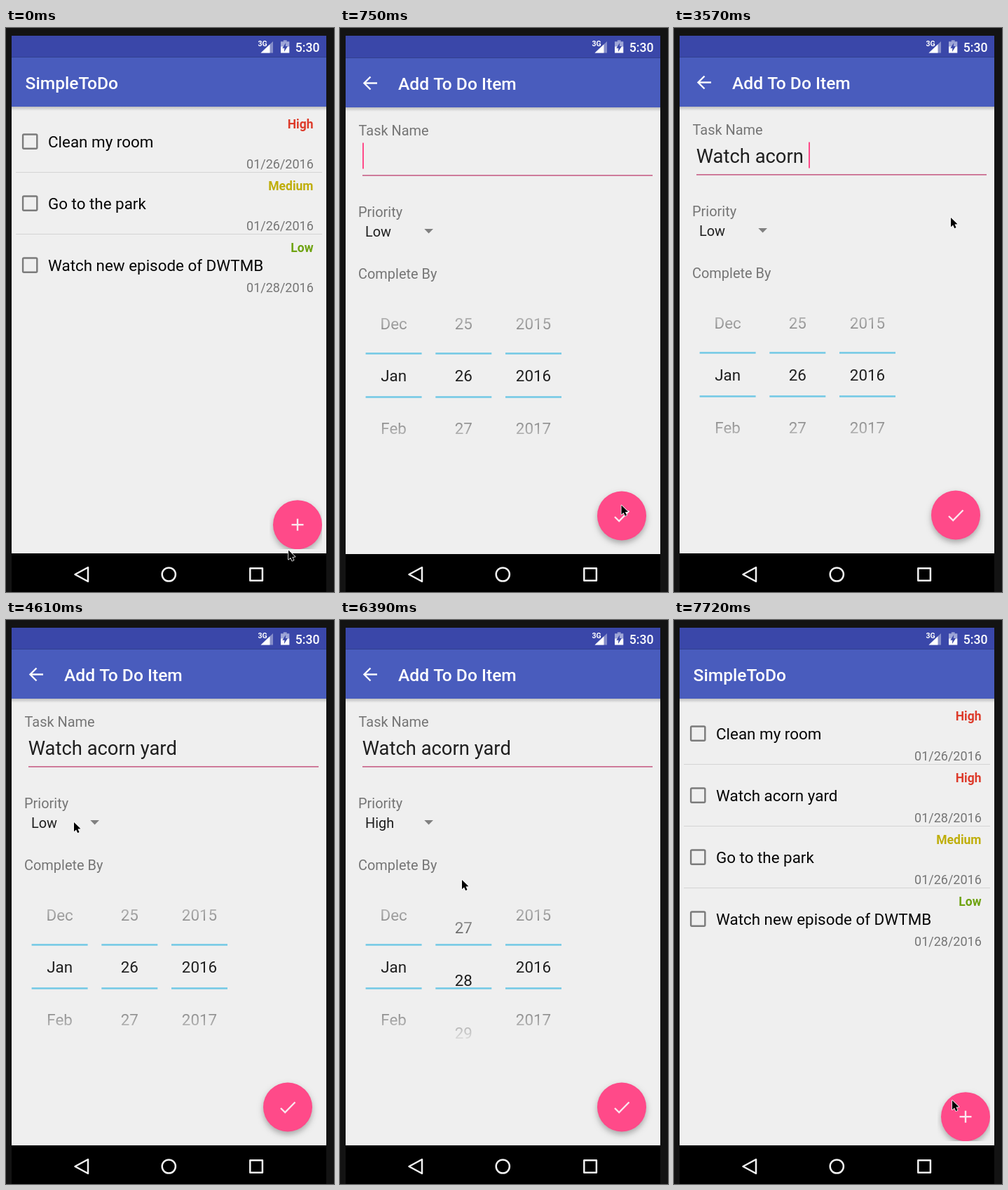
Recreate the animation shown at these times as an HTML page with a canvas. Size 468 by 803 pixels, loop 8000 ms.

```html
<!DOCTYPE html>
<html lang="en">
<head>
<meta charset="utf-8">
<title>To-do app</title>
<style>
  html, body { margin: 0; width: 100%; height: 100%; overflow: hidden; background: #131313; }
  canvas { display: block; }
</style>
</head>
<body>
<canvas id="stage" width="468" height="803"></canvas>
<script>
// The picture advances in equal steps; all times below are in steps.
const LOOP = 8000, STEPS = 54;
const OPEN = 4, TYPE = 9, POPUP = 32, PRESS = 37, PICK = 38, DRAG = 39, DROP = 43, CLOSE = 51, SAVED = 52;

const BG = '#efefef', CLEAR_BG = 'rgba(239,239,239,.2)', PINK = '#ff4a89';
const INK = '#1f1f1f', GREY = '#757575', WHITE = '#f2f2f2';
const LEVELS = { High: '#dd3b2b', Medium: '#bfae0a', Low: '#6fa312' };
const ROW = 74.7;

// Keys struck in each step; "<" is backspace
const KEYS = 'W,a,,ch,,,<,<,t,c,h, a,co,rn,, ,y,a,r,d'.split(',');

const POINTER_START = { x: 403, y: 743.5 };
const MOVES = [
  { from: 0, to: 2, x: 402.5, y: 727 },
  { from: 3, to: OPEN, x: 401.5, y: 679.5 },
  { from: 5, to: 7, x: 395, y: 270 },
  { from: 28, to: 31, x: 97, y: 288 },
  { from: 33, to: 36, x: 81, y: 417 },
  { from: PRESS, to: PICK, x: 178, y: 500 },
  { from: DRAG, to: DROP, x: 174, y: 370 },
  { from: DROP, to: 46, x: 417, y: 759 },
  { from: 46, to: 48, x: 397, y: 684 }
];

const stage = document.getElementById('stage').getContext('2d');
const layer = Object.assign(document.createElement('canvas'), { width: 468, height: 803 }).getContext('2d');
let c = stage;

const progress = (s, from, to) => Math.min(1, Math.max(0, (s - from) / (to - from)));
const smooth = k => k * k * (3 - 2 * k);
const easeOut = k => 1 - (1 - k) ** 2;

function typed(s) {
  const keys = KEYS.slice(0, Math.max(0, s - TYPE + 1)).join('');
  return [...keys].reduce((word, key) => key === '<' ? word.slice(0, -1) : word + key, '');
}

function pointerAt(s) {
  return MOVES.reduce((p, move) => {
    const k = smooth(progress(s, move.from, move.to));
    return { x: p.x + (move.x - p.x) * k, y: p.y + (move.y - p.y) * k };
  }, POINTER_START);
}

// Days scrolled: a drag, then a slow snap onto the nearest row
const daysScrolled = s => 1.75 * smooth(progress(s, DRAG, DROP)) + 0.25 * easeOut(progress(s, DROP, 48));

// Solid while typing, later blinking once a second
const caretOn = s => s < 31 || (s > DRAG && (s + 2) % 6.75 < 3.375);

function rect(x, y, w, h, fill) {
  c.fillStyle = fill;
  c.fillRect(x, y, w, h);
}

// y is the middle of the capital letters
function text(str, x, y, size, fill, { weight = 400, align = 'left' } = {}) {
  c.font = `${weight} ${size}px Roboto, sans-serif`;
  c.textAlign = align;
  c.fillStyle = fill;
  c.fillText(str, x, y + size * 0.355);
}

function path(points, closed) {
  c.beginPath();
  points.forEach(([x, y]) => c.lineTo(x, y));
  if (closed) c.closePath();
}

function circle(x, y, r) {
  c.beginPath();
  c.arc(x, y, r, 0, 2 * Math.PI);
}

function box(x, y, w, h, r) {
  c.beginPath();
  c.roundRect(x, y, w, h, r);
}

function stroke(color, width) {
  c.strokeStyle = color;
  c.lineWidth = width;
  c.stroke();
}

function fill(color) {
  c.fillStyle = color;
  c.fill();
}

function clipped(x, y, w, h, draw) {
  c.save();
  c.beginPath();
  c.rect(x, y, w, h);
  c.clip();
  draw();
  c.restore();
}

function withShadow(alpha, blur, dy, draw) {
  c.save();
  c.shadowColor = `rgba(0,0,0,${alpha})`;
  c.shadowBlur = blur;
  c.shadowOffsetY = dy;
  draw();
  c.restore();
}

function vertical(y0, y1, from, to) {
  const g = c.createLinearGradient(0, y0, 0, y1);
  g.addColorStop(0, from);
  g.addColorStop(1, to);
  return g;
}

function windowBase(title, titleX) {
  rect(8, 11, 449, 737, BG);
  rect(8, 112, 449, 6, vertical(112, 118, 'rgba(0,0,0,.2)', 'rgba(0,0,0,0)'));
  rect(8, 11, 449, 31, '#3a47a9');
  rect(8, 42, 449, 70, '#495cbd');
  rect(8, 41, 449, 1, '#32408f');
  text(title, titleX, 78, 24.6, '#fff', { weight: 500 });
}

function fab(x, y, icon) {
  withShadow(0.3, 9, 4, () => {
    circle(x, y, 35);
    fill(PINK);
  });
  icon.forEach(line => {
    path(line.map(([dx, dy]) => [x + dx, y + dy]));
    stroke('#fbe6ee', 2.4);
  });
}

function listScreen(items) {
  windowBase('SimpleToDo', 27.6);
  items.forEach(([name, level, date], i) => {
    const y = 162 + i * 88;
    if (i) rect(14, y - 45, 437, 1, '#d4d4d4');
    box(24.1, y - 10.5, 20.2, 20.2, 1.5);
    stroke('#7b7b7b', 2.4);
    text(name, 60, y, 22.4, '#050505');
    text(level, 438.5, y - 25, 17.5, LEVELS[level], { weight: 700, align: 'right' });
    text(date, 438.8, y + 32, 18, GREY, { align: 'right' });
  });
  // The button's shadow is cut off by its own bounds
  clipped(376, 667, 75, 75, () =>
    fab(416, 707.2, [[[-8.5, 0], [8.5, 0]], [[0, -8.5], [0, 8.5]]]));
}

function picker(column, labels, scroll = 0) {
  const x = 76.6 + 99.7 * column, left = x - 40;
  clipped(left, 383, 80, 223, () => {
    labels.forEach((label, i) =>
      text(label, x, 419.8 + ROW * (i - scroll), 22.4, INK, { align: 'center' }));
    rect(left, 383, 80, 78, vertical(383, 461, BG, CLEAR_BG));
    rect(left, 528, 80, 78, vertical(528, 606, CLEAR_BG, BG));
  });
  for (const y of [461.2, 523.2]) rect(left, y, 80, 2.5, '#72c9e5');
}

function popup(s) {
  c.save();
  c.globalAlpha = s > POPUP ? 1 : 0.6;
  box(16, 263, 119, 276, 20);
  fill('rgba(0,0,0,.018)');
  withShadow(0.32, 13, 4, () => rect(27, 273, 92, 240, '#f0f0f0'));
  if (s >= PRESS) rect(27, 393, 92, 60, '#eaeaea');
  ['Low', 'Medium', 'High', 'Urgent'].forEach((name, i) =>
    text(name, 36.3, 304 + i * 59.8, 19.95, '#111'));
  c.restore();
}

function formScreen(s) {
  windowBase('Add To Do Item', 83);
  path([[53, 77.5], [34.5, 77.5]]);
  stroke('#fff', 2.4);
  path([[43.5, 68.5], [34.5, 77.5], [43.5, 86.5]]);
  stroke('#fff', 2.4);

  text('Task Name', 26.5, 145, 19.95, GREY);
  const task = typed(s);
  text(task, 31.7, 182, 27.4, INK);
  if (caretOn(s)) rect(32 + c.measureText(task).width, 162.5, 2, 37, PINK);
  rect(32, 208, 414, 1.7, '#c9688d');

  text('Priority', 26, 261, 19.95, GREY);
  text(s < PICK ? 'Low' : 'High', 36, 289, 19.95, INK);
  path([[120.3, 285], [133, 285], [126.6, 291.6]], true);
  fill('#808080');

  text('Complete By', 26, 349, 19.95, GREY);
  picker(0, ['Dec', 'Jan', 'Feb']);
  picker(1, [25, 26, 27, 28, 29, 30], daysScrolled(s));
  picker(2, [2015, 2016, 2017]);

  fab(402, 693.5, [[[-10, 1.5], [-3.8, 7.5], [10.5, -7]]]);
  if (s >= POPUP && s < PICK) popup(s);
}

function statusIcons() {
  text('3G', 359.5, 22.3, 10.5, '#fff', { weight: 700 });
  path([[381, 19], [381, 35.5], [363.5, 35.5]], true);
  fill('rgba(255,255,255,.38)');
  path([[376.5, 23.3], [376.5, 35.5], [363.5, 35.5]], true);
  fill('#fff');

  rect(395.8, 17.5, 4.8, 2, '#9fa7d8');
  rect(392, 19.3, 12.3, 7, '#9fa7d8');
  rect(392, 26.3, 12.3, 9.2, '#fff');
  path([[399.3, 21], [394.3, 28.8], [397.4, 28.8], [396.8, 34], [402, 26], [398.8, 26]], true);
  fill('#3a47a9');
  text('5:30', 447.5, 27.3, 17.6, '#fff', { weight: 500, align: 'right' });
}

function navBar() {
  rect(8, 748, 449, 55, '#000');
  c.lineJoin = 'round';
  path([[98.5, 778], [117, 768], [117, 788]], true);
  stroke(WHITE, 2.5);
  circle(232.3, 778, 9.6);
  stroke(WHITE, 2.5);
  box(348.3, 769.2, 17.6, 17.6, 0);
  stroke(WHITE, 2.5);
  c.lineJoin = 'miter';
}

function pointer({ x, y }) {
  c.save();
  c.translate(x, y);
  c.scale(0.88, 0.88);
  path([[0, 0], [0, 15], [3.5, 11.8], [6, 17.2], [8.6, 16], [6.2, 10.8], [10.8, 10.6]], true);
  c.lineJoin = 'round';
  stroke('#fff', 1.8);
  fill('#000');
  c.restore();
}

function formWindow(s) {
  c = layer;
  c.clearRect(0, 0, 468, 803);
  clipped(8, 11, 449, 737, () => formScreen(s));
  c = stage;
  // Slides up while fading in, and starts to slide back down on closing
  const shift = s < OPEN + 2 ? 24 ** (OPEN + 1 - s) : s >= CLOSE ? 1 : 0;
  c.globalAlpha = s > OPEN ? 1 : 0.55;
  c.drawImage(layer.canvas, 0, shift);
  c.globalAlpha = 1;
}

function render(s) {
  const items = [
    ['Clean my room', 'High', '01/26/2016'],
    ['Go to the park', 'Medium', '01/26/2016'],
    ['Watch new episode of DWTMB', 'Low', '01/28/2016']
  ];
  if (s >= SAVED) items.splice(1, 0, [typed(s), 'High', '01/28/2016']);

  rect(0, 0, 468, 803, '#131313');
  listScreen(items);
  navBar();
  if (s >= OPEN && s < SAVED) formWindow(s);
  statusIcons();
  pointer(pointerAt(s));
}

const start = performance.now();
function tick() {
  const t = (performance.now() - start) % LOOP;
  // A few ms of lead absorb the rounding of step times
  render(Math.min(STEPS - 1, Math.floor((t + 6) * STEPS / LOOP)));
  requestAnimationFrame(tick);
}
tick();
</script>
</body>
</html>
```
